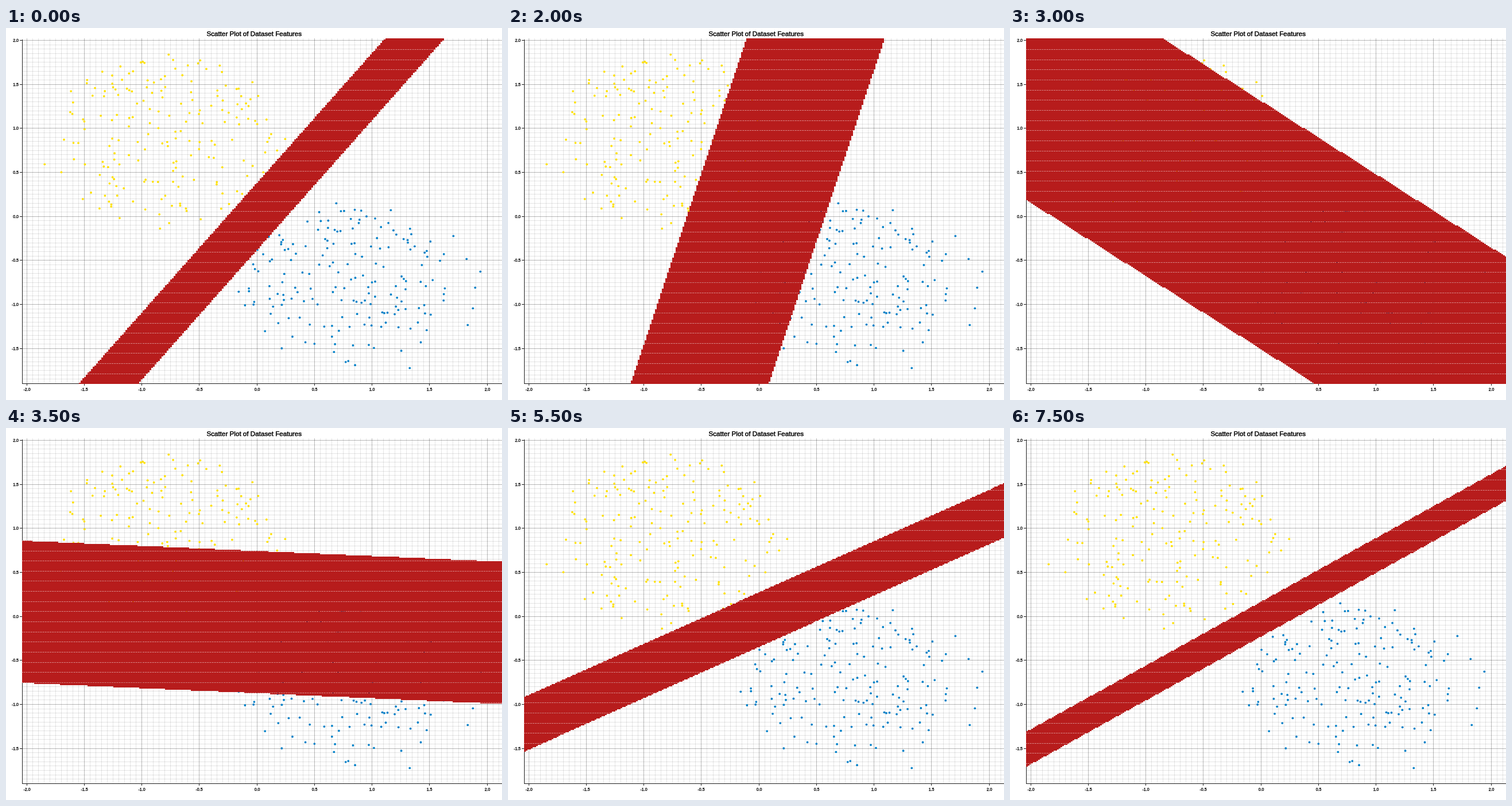
These frames come from a looping animation (864x648 px, 8000 ms). An HTML page with a canvas:

```html
<!DOCTYPE html>
<html lang="en">
<head>
<meta charset="utf-8">
<title>Scatter Plot</title>
<style>
  html, body { margin: 0; width: 100%; height: 100%; overflow: hidden; background: #fff; }
  svg, canvas { position: absolute; left: 0; top: 0; display: block; }
  text { font-family: "Liberation Sans", Arial, sans-serif; fill: #000; stroke: #000; stroke-width: .3px; }
  .title { font-size: 11.65px; stroke-width: .45px; }
  .label { font-size: 7px; }
  .minor { stroke: #000; stroke-opacity: .1; }
  .major { stroke: #000; stroke-opacity: .28; }
  .axis { stroke: #222; }
  .yellow { fill: #ffe100; }
  .blue { fill: #0080c8; }
</style>
</head>
<body>
<svg id="plot" width="864" height="648" viewBox="0 0 864 648"></svg>
<canvas id="band" width="864" height="648"></canvas>
<script>
const LEFT = 28, RIGHT = 864, TOP = 18, BOTTOM = 619;
const UNIT_X = 200.5, UNIT_Y = 153.4, ZERO_X = 437.2, ZERO_Y = 328.2;
const STEP_MS = 500, STEPS = 16, RESTART = 6;

const toPx = x => ZERO_X + x * UNIT_X;
const toPy = y => ZERO_Y - y * UNIT_Y;
const toX = px => (px - ZERO_X) / UNIT_X;
const toY = py => (ZERO_Y - py) / UNIT_Y;

// Weights [w1, w2, b] after a training step; the band is |w1 x + w2 y + b| < 1.
// Training starts afresh at RESTART and slows down as it converges.
function weightsAt(step) {
  if (step < RESTART) {
    const k = step;
    return [3.86 - .54 * k + .035 * Math.sin(.4 * Math.PI * k), -2.62 + .5 * k + .012 * k * k, .011 * k];
  }
  const k = step - RESTART;
  return [-.59 + .525 * k - .006 * k * k, -.709 - .535 * k + .006 * k * k, -.07 - .0098 * k];
}
const score = ([w1, w2, b], x, y) => w1 * x + w2 * y + b;

const plot = document.getElementById('plot');
function add(tag, attrs, text) {
  const el = document.createElementNS('http://www.w3.org/2000/svg', tag);
  for (const key in attrs) el.setAttribute(key, attrs[key]);
  if (text) el.textContent = text;
  plot.append(el);
}
const line = (cls, x1, y1, x2, y2) => add('line', { class: cls, x1, y1, x2, y2 });
const label = (x, y, anchor, value) =>
  add('text', { class: 'label', x, y, 'text-anchor': anchor }, value.toFixed(1));
const snap = v => Math.floor(v) + .5;

function drawGrid() {
  for (let i = -40; i <= 42; i++) {
    const value = i / 20, isMajor = i % 10 === 0;
    const cls = isMajor ? 'major' : 'minor';
    const x = snap(toPx(value)), y = snap(toPy(value));
    const inRange = y > TOP && y < BOTTOM;
    line(cls, x, TOP, x, BOTTOM);
    if (inRange) line(cls, LEFT, y, RIGHT, y);
    if (!isMajor) continue;
    line('axis', x, BOTTOM, x, BOTTOM + 4);
    label(x, 632, 'middle', value);
    if (inRange) {
      line('axis', LEFT - 4, y, LEFT, y);
      label(22, y + 2.5, 'end', value);
    }
  }
  line('axis', LEFT + .5, 20, LEFT + .5, BOTTOM + 1);
  line('axis', LEFT, BOTTOM + .5, RIGHT, BOTTOM + .5);
  add('text', { class: 'title', x: 432.3, y: 13.5, 'text-anchor': 'middle' }, 'Scatter Plot of Dataset Features');
}

let seed = 7;
const random = () => (seed = seed * 16807 % 2147483647) / 2147483647;

// Fills an ellipse with random points outside the final margin, around a few outlying ones.
function drawCluster(cls, outliers, cx, cy, rx, ry, total) {
  const points = [...outliers];
  const last = weightsAt(STEPS - 1);
  const side = Math.sign(score(last, toX(cx), toY(cy)));
  while (points.length < total) {
    const angle = random() * 2 * Math.PI, r = Math.sqrt(random());
    const x = cx + rx * r * Math.cos(angle), y = cy + ry * r * Math.sin(angle);
    const free = points.every(p => Math.hypot(p[0] - x, p[1] - y) > 3);
    if (free && side * score(last, toX(x), toY(y)) > 1.1) points.push([x, y]);
  }
  for (const [x, y] of points) add('circle', { class: cls, cx: x + .3, cy: y + .3, r: 1.9 });
}

const ctx = document.getElementById('band').getContext('2d');
const clamp = x => Math.min(RIGHT, Math.max(LEFT, x));
const toColumn = x => LEFT + Math.round((clamp(x) - LEFT) / 3) * 3;

function drawBand([w1, w2, b]) {
  ctx.clearRect(0, 0, 864, 648);
  ctx.fillStyle = '#b71c1c';
  for (let y = TOP; y <= BOTTOM; y += 2) {
    const rest = b + w2 * toY(y + 1);
    const ends = [toPx((-1 - rest) / w1), toPx((1 - rest) / w1)].sort((p, q) => p - q);
    const from = toColumn(ends[0]), to = toColumn(ends[1]);
    if (to > from) ctx.fillRect(from, y, to - from, Math.min(2, BOTTOM + 1 - y));
  }
  // Dotted seams between rows of marks
  for (let y = 37; y < BOTTOM; y += 17.65) {
    for (let x = LEFT + 1; x < RIGHT; x += 3) ctx.clearRect(x, Math.round(y), 1, 1);
  }
}

let shown = -1;
function frame() {
  const step = Math.floor(performance.now() / STEP_MS) % STEPS;
  if (step !== shown) drawBand(weightsAt(shown = step));
  requestAnimationFrame(frame);
}

drawGrid();
drawCluster('yellow', [
  [283, 46], [338, 56], [372, 65], [429, 94], [439, 118],
  [486, 193], [472, 213], [448, 251], [268, 349], [67, 237]
], 265, 198, 198, 148, 188);
drawCluster('blue', [
  [575, 305], [670, 317], [779, 362], [802, 402], [826, 424],
  [817, 452], [813, 488], [804, 517], [703, 592], [405, 459]
], 595, 452, 185, 138, 186);
frame();
</script>
</body>
</html>
```
